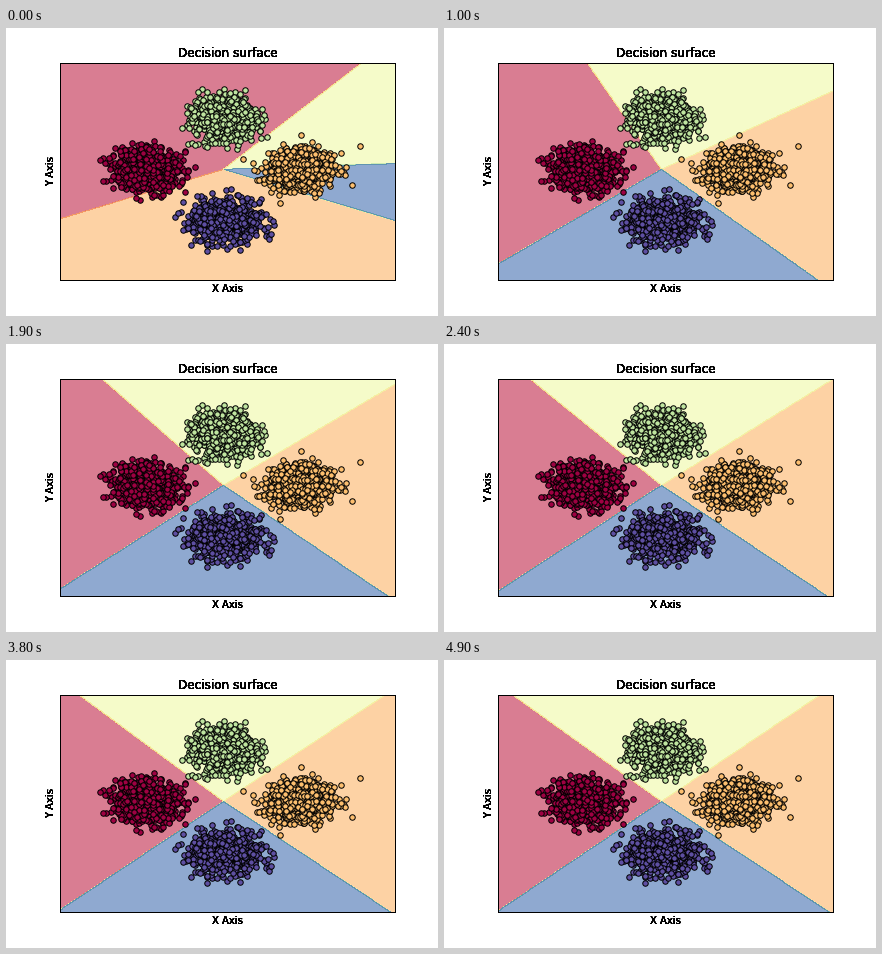
Write a matplotlib script that moves like this. It is 432 by 288 pixels and loops after 5 s.

```python
import numpy as np
import matplotlib.pyplot as plt
from matplotlib.animation import FuncAnimation

plt.rcParams["font.family"] = "DejaVu Sans"

FRAMES, INTERVAL = 50, 100
WIDTH, HEIGHT, DPI = 432, 288, 72
XLIM, YLIM = (-4.23, 4.432), (-4.393, 4.236)
CENTERS = [(-2, 0), (2, 0), (0, 2), (0, -2)]
POINTS, SPREAD = 1000, 0.4
CMAP = plt.get_cmap("Spectral")

# Class weights relative to the first class: start and direction of learning.
START = np.array([(0, 0), (3.76, -8.09), (4.21, -3.57), (4.37, -6.76)])
GROWTH = np.array([(0, 0), (2, 0.07), (1, 0.99), (0.99, -0.935)])

fig = plt.figure(figsize=(WIDTH / DPI, HEIGHT / DPI), dpi=DPI, facecolor="white")
ax = fig.add_axes([0.125, 0.125, 0.775, 0.755])
ax.set(xlim=XLIM, ylim=YLIM, xticks=[], yticks=[])
for spine in ax.spines.values():
    spine.set_linewidth(1)


def label(x, y, text, size, angle=0):
    # Stacked copies give the dense, dark lettering.
    for _ in range(10):
        fig.text(x / WIDTH, 1 - y / HEIGHT, text, fontsize=size, rotation=angle,
                 ha="center", va="baseline", rotation_mode="anchor")


label(221.4, 29.3, "Decision surface", 12)
label(221.4, 264, "X Axis", 10)
label(47.6, 143.3, "Y Axis", 10, 90)

rng = np.random.RandomState(0)
for k, center in enumerate(CENTERS):
    points = rng.normal(center, SPREAD, (POINTS, 2))
    ax.scatter(*points.T, s=30, color=CMAP(k / 3), edgecolors="black",
               linewidths=1, zorder=2)

grid_x, grid_y = np.meshgrid(np.linspace(*XLIM, 434), np.linspace(*YLIM, 432))
levels = np.arange(9) * 0.4
surface = None


def progress(step):
    # Slow start that settles into steady growth.
    return 2.52 * step ** 2 / (step + 14.6)


def update(step):
    global surface
    if surface is not None:
        surface.remove()
    weights = START + progress(step) * GROWTH
    scores = [wx * grid_x + wy * grid_y for wx, wy in weights]
    classes = np.argmax(scores, axis=0).astype(float)
    surface = ax.contourf(grid_x, grid_y, classes, levels=levels, cmap=CMAP,
                          vmin=0, vmax=3.2, alpha=0.6, zorder=1)
    return []


anim = FuncAnimation(fig, update, frames=FRAMES, interval=INTERVAL,
                     init_func=lambda: [], repeat=True, repeat_delay=0)
plt.show()
```
